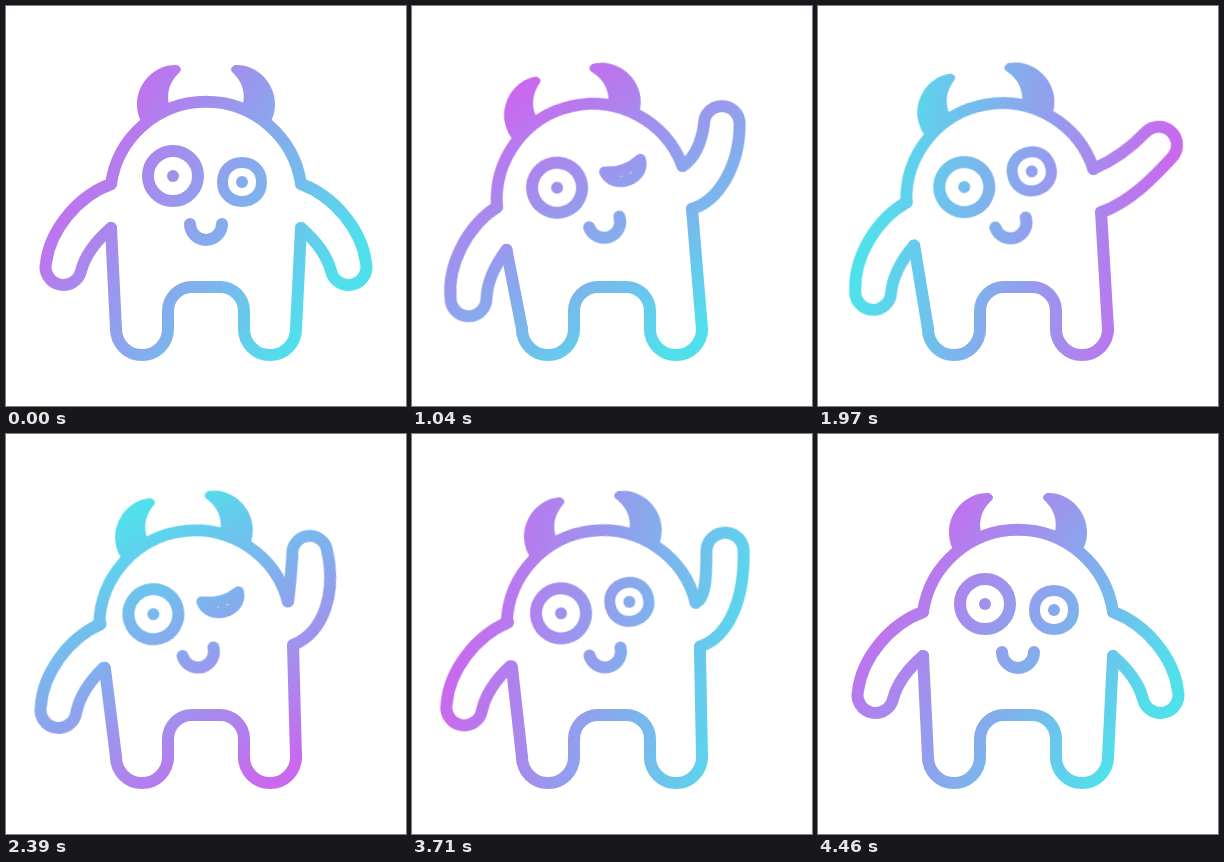
An HTML page without scripts for the animation above (4490 ms loop, 400 by 400 pixels).

```html
<!DOCTYPE html>
<html lang="en">
<head>
<meta charset="utf-8">
<title>Waving monster</title>
<style>
  html, body { margin: 0; width: 100%; height: 100%; overflow: hidden; background: #fff; }
  svg { display: block; width: 100vw; height: 100vh; isolation: isolate; }

  .line { fill: none; stroke: #000; stroke-width: 12; stroke-linecap: round; stroke-linejoin: round; }
  .eye { stroke-width: 11; }

  .torso, .sides, .left-arm, .right-arm, .face, .wink, .tint {
    animation: 4490ms ease-in-out infinite;
  }
  .torso { transform-origin: 200px 281px; animation-name: lean; }
  .sides { animation-name: sides; }
  .left-arm { transform-origin: 105px 200px; animation-name: swing; }
  .right-arm { animation-name: wave; }
  .face { transform-origin: 201px 173px; animation-name: look; }
  .wink { animation-name: wink; }

  /* Screen blending turns the black figure into the gradient and keeps white white */
  .tint {
    mix-blend-mode: screen;
    transform-origin: 200px 207px;
    animation-name: spin;
    animation-timing-function: linear;
  }

  @keyframes lean {
    0%, 11.14%, 95.1%, 100% { transform: rotate(0deg); }
    23.16% { transform: rotate(-12.5deg); }
    35.19%, 59.02% { transform: rotate(-3.1deg); }
    47%, 71.05% { transform: rotate(-11.3deg); }
  }
  /* Flanks join the leaning shoulders to the fixed feet */
  @keyframes sides {
    0%, 11.14%, 95.1%, 100% { d: path("M105 222L110 323M295 222L290 323"); }
    23.16% { d: path("M94.5 244L110 323M280 203L290 323"); }
    35.19%, 59.02% { d: path("M102 227L110 323M291.7 217L290 323"); }
    47%, 71.05% { d: path("M95.2 241.7L110 323M281.6 204.5L290 323"); }
  }
  @keyframes swing {
    0%, 23.16%, 47%, 71.05%, 95.1%, 100% { transform: rotate(0deg); }
    35.19%, 59.02% { transform: rotate(6deg); }
    82.63% { transform: rotate(3.5deg); }
  }
  @keyframes wave {
    0%, 11.14%, 95.1%, 100% {
      d: path("M295 178C328 190 356 224 360 257A1 1 0 0 1 325 265C321 250 309 234 295 222");
      animation-timing-function: ease-in;
    }
    17.15%, 88.86% {
      d: path("M295 178C320 179 345 180 369 182A1 1 0 0 1 369 218C345 219 320 221 295 222");
      animation-timing-function: ease-out;
    }
    23.16% { d: path("M295 178C308 174 319 159 325 142A1 1 0 0 1 360 149C351 190 323 220 295 222"); }
    35.19%, 53.23% { d: path("M295 178C299 165 302 147 305 133A1 1 0 0 1 340 133C344 173 329 212 295 222"); }
    44.1%, 65.26%, 71.94% { d: path("M295 178C313 174 334 165 353 151A1 1 0 0 1 374 181C354 196 326 217 295 222"); }
    81.07%, 82.63% {
      d: path("M295 178C304 175 308 160 311 128A1 1 0 0 1 348 132C344 179 325 215 295 222");
      animation-timing-function: ease-in;
    }
  }
  @keyframes look {
    0%, 11.14%, 95.1%, 100% { transform: translate(0, 0) rotate(0deg); }
    23.16% { transform: translate(1px, -2px) rotate(-7deg); }
    35.19% { transform: translate(2px, -2.5px) rotate(-7.4deg); }
    53.23%, 82.63% { transform: translate(-7px, -.5px) rotate(-8.5deg); }
    65.92% { transform: translate(8px, -2.5px) rotate(-4deg); }
  }
  @keyframes wink {
    0%, 13.1%, 34.7%, 47%, 59.02%, 100% {
      d: path("M216.5 176C216.5 150 255.5 150 255.5 176C255.5 202 216.5 202 216.5 176Z");
    }
    22.3%, 24.5%, 53%, 54% {
      d: path("M217 171C229 176 243 176 255 171C254 192 219 192 217 171Z");
    }
  }
  @keyframes spin {
    0%, 11.14% { transform: rotate(33deg); animation-timing-function: ease-in; }
    23.16% { transform: rotate(56deg); }
    35.19% { transform: rotate(138deg); }
    53.23% { transform: rotate(242deg); }
    65.92% { transform: rotate(320deg); }
    82.63% { transform: rotate(372deg); animation-timing-function: ease-out; }
    99.33%, 100% { transform: rotate(393deg); }
  }
</style>
</head>
<body>
<svg viewBox="0 0 400 400">
  <defs>
    <linearGradient id="hue" gradientUnits="userSpaceOnUse" x1="52" y1="0" x2="348" y2="0">
      <stop stop-color="#c869ee"/>
      <stop offset="1" stop-color="#50e0ec"/>
    </linearGradient>
    <path id="horn" d="M171 59C149 58 131 77 131 98C131 106 133 112 136 117L164 102C159 86 165 74 174 66Q177 62 171 59Z"/>
  </defs>

  <rect width="400" height="400" fill="#fff"/>

  <path class="line" d="M110 323A26 26 0 0 0 162 323V305A24 24 0 0 1 186 281H214A24 24 0 0 1 238 305V323A26 26 0 0 0 290 323"/>
  <path class="line sides" d="M105 222L110 323M295 222L290 323"/>

  <g class="torso">
    <use href="#horn"/>
    <use href="#horn" transform="matrix(-1 0 0 1 400 0)"/>
    <path class="line" d="M105 178A96 96 0 0 1 295 178"/>
    <path class="line left-arm" d="M105 178C72 190 44 224 40 257A1 1 0 0 0 75 265C79 250 91 234 105 222"/>
    <path class="line right-arm" d="M295 178C328 190 356 224 360 257A1 1 0 0 1 325 265C321 250 309 234 295 222"/>
    <g class="face">
      <circle class="line" cx="167" cy="170" r="25"/>
      <circle cx="167" cy="170" r="6"/>
      <path class="line eye wink" d="M216.5 176C216.5 150 255.5 150 255.5 176C255.5 202 216.5 202 216.5 176Z"/>
      <circle cx="236" cy="176" r="6"/>
      <path class="line" d="M184 218A16 16 0 0 0 216 218"/>
    </g>
  </g>

  <rect class="tint" x="-300" y="-300" width="1000" height="1000" fill="url(#hue)"/>
</svg>
</body>
</html>
```
